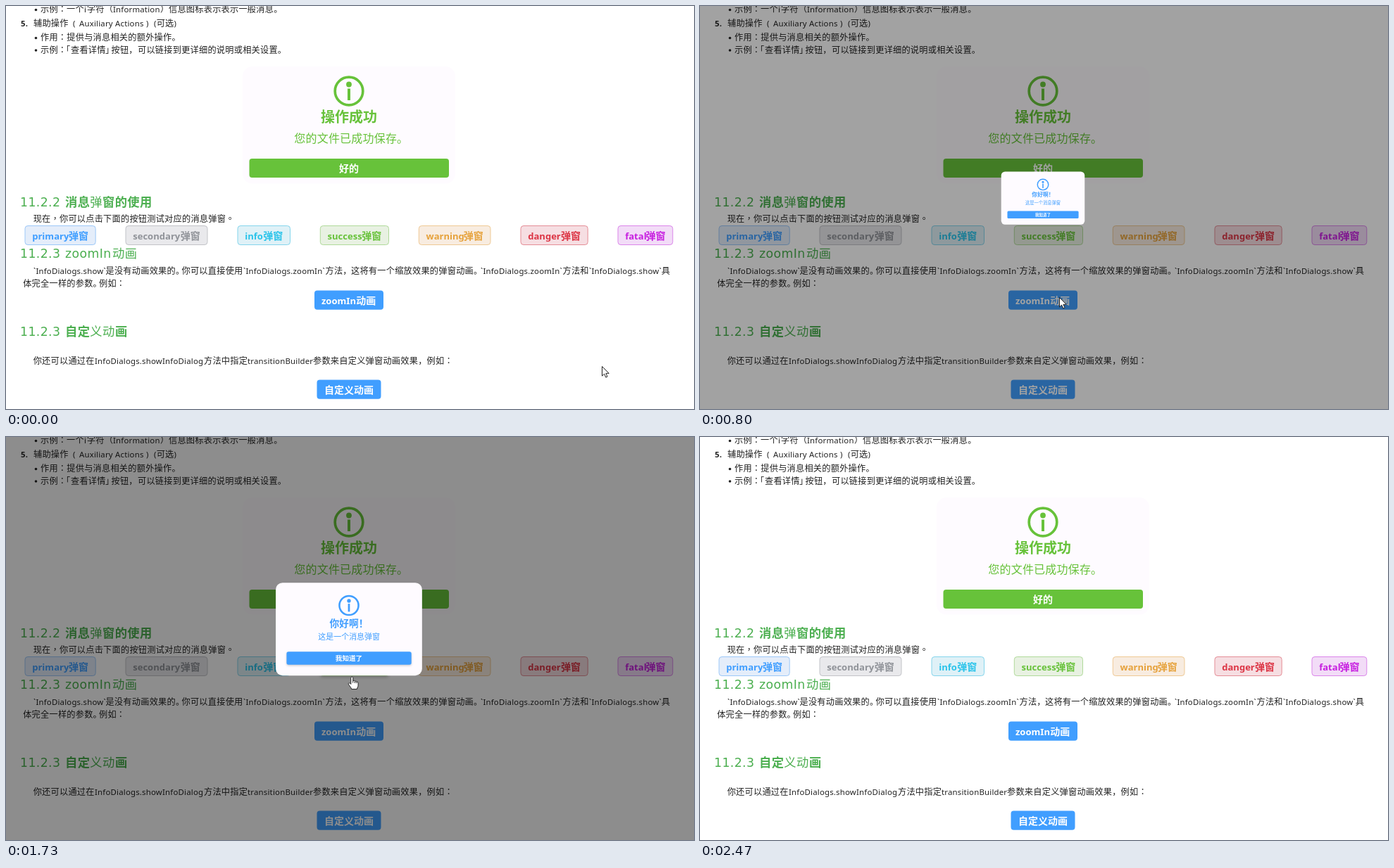
Recreate the animation shown at these times as an HTML page. Size 977 by 573 pixels, loop 3 s.

```html
<!DOCTYPE html>
<html lang="zh-CN">
<head>
<meta charset="utf-8">
<title>InfoDialogs</title>
<style>
html, body { margin: 0; width: 100%; height: 100%; overflow: hidden; background: #fff; }
svg { display: block; width: 977px; height: 573px; }
text { font-family: "Noto Sans CJK SC", "Noto Sans CJK", sans-serif; white-space: pre; text-spacing-trim: space-all; }
.latin { font-family: "Noto Sans", "Open Sans", sans-serif; }
.mid { font-family: "Noto Sans CJK TC", "Noto Sans CJK SC", sans-serif; }
.body { font-size: 12.2px; letter-spacing: .24px; font-weight: 350; fill: #222; }
.body .latin { font-size: 11.4px; letter-spacing: .2px; font-weight: 400; }
.btn { font-size: 14px; font-weight: 700; }
.btn .latin { font-size: 13.05px; }
.head { font-size: 17.3px; letter-spacing: .4px; fill: #4caf50; font-weight: 350; }
.head .latin { font-family: "DejaVu Sans", sans-serif; font-weight: 400; }
.title { font-size: 20px; font-weight: 700; }
.note { font-size: 16px; font-weight: 350; }
.bold { font-weight: 700; }
</style>
</head>
<body>
<svg id="stage" viewBox="0 0 977 573"></svg>
<script>
const BLUE = '#409eff', GREEN = '#67c23a';

// Latin runs get their own font; a colon or a char after ^ is a centred mark.
const runs = str => str.split(/(\^.|：|[ -\]_-~]+)/).filter(Boolean).map(s => {
  if (s[0] === '^' || s === '：') return `<tspan class="mid" lang="zh-TW">${s.slice(-1)}</tspan>`;
  return /[ -~]/.test(s[0]) ? `<tspan class="latin">${s}</tspan>` : `<tspan>${s}</tspan>`;
}).join('');

const text = (cls, x, y, str, fill) =>
  `<text class="${cls}" x="${x}" y="${y}"${fill ? ` style="fill:${fill}"` : ''}>${runs(str)}</text>`;

// parts: x, string, x, string ...
const line = (cls, y, ...parts) => {
  let out = '';
  for (let i = 0; i < parts.length; i += 2) out += text(cls, parts[i], y, parts[i + 1]);
  return out;
};

const box = (x, y, w, h, r, fill, stroke = 'none') =>
  `<rect x="${x}" y="${y}" width="${w}" height="${h}" rx="${r}" fill="${fill}" stroke="${stroke}"/>`;

const bullet = y => `<circle cx="42.5" cy="${y}" r="1.8" fill="#222"/>`;

const infoIcon = (cy, color) =>
  `<g fill="${color}"><circle cx="487" cy="${cy}" r="19.8" fill="none" stroke="${color}" stroke-width="3.7"/>
   <circle cx="487" cy="${cy - 9.5}" r="3.9"/><rect x="485" y="${cy - 3.5}" width="4" height="16.5"/></g>`;

const chip = ([name, x, end, color, bg, edge]) => {
  const label = c => text('btn', x + 10.2, 331.7, name, c) + text('btn', end - 38.3, 331.7, '弹窗', c);
  const rect = (fill, stroke) => box(x, 312.5, end - x, 27, 4, fill, stroke);
  const hover = name === 'success'
    ? `<g id="fill" opacity="0">${rect(color, color)}${label('#fff')}</g>` : '';
  return `<g id="${name}">${rect(bg, edge)}${label(color)}${hover}</g>`;
};

const chips = [
  ['primary', 27, 127.2, BLUE, '#e4edfa', '#9cc8f8'],
  ['secondary', 170, 286, '#909399', '#e9e9ec', '#c2c3c8'],
  ['info', 329, 403.5, '#29c3ea', '#dff1f7', '#85d5ec'],
  ['success', 446.3, 543.5, GREEN, '#e8f1e2', '#b0da9a'],
  ['warning', 586.3, 688, '#e6a23c', '#f8ece0', '#efc994'],
  ['danger', 731, 826.2, '#dc3545', '#f6dee2', '#e48d96'],
  ['fatal', 869, 946.8, '#c71fe0', '#f2dcf7', '#db85ea']
];

const page =
  bullet(5.5) + line('body', 9, 49, '示例：', 86, '一个', 111, 'i', 115, '字符（', 152, 'Information', 219, '）', 231, '信息图标表示表示一般消息。') +
  text('body bold', 21, 28.6, '5.').replace('class="latin"', 'class="latin" style="font-weight:700"') +
  line('body', 28.6, 39, '辅助操作', 95, '(', 104, 'Auxiliary Actions', 199, ')', 210, '(可选)') +
  bullet(45.5) + line('body', 49.3, 49, '作用：提供与消息相关的额外操作。') +
  bullet(63) + line('body', 66.7, 49, '示例：', 79, '「', 92, '查看详情', 141, '」', 149.5, '按钮，', 187, '可以链接到更详细的说明或相关设置。') +
  box(336, 86, 302, 166.5, 14, '#fefbff') + infoIcon(121, GREEN) +
  text('title', 447, 165.3, '操作成功', GREEN) +
  `<g letter-spacing=".2">${text('note', 409.3, 193.5, '您的文件已成功保存。', GREEN)}</g>` +
  box(345.5, 217, 283.5, 27, 4, GREEN) + text('btn', 473, 235.8, '好的', '#fff') +
  line('head', 284.8, 20, '11.2.2', 119.3, '弹') + line('head bold', 284.8, 84, '消息', 137, '窗的使用') +
  line('body', 306.7, 38.7, '现在^，你可以点击下面的按钮测试对应的消息弹窗^。') +
  chips.map(chip).join('') +
  line('head', 358.4, 20, '11.2.3', 84, 'zoomIn', 151, '动画') +
  line('body', 381.3, 39, '`InfoDialogs.show`', 141.5, '是没有动画效果的。', 249.5, '你可以直接使用', 337, '`InfoDialogs.zoomIn`',
    453.5, '方法，', 490, '这将有一个缩放效果的弹窗动画。', 674, '`InfoDialogs.zoomIn`', 790.5, '方法和', 828, '`InfoDialogs.show`', 930.7, '具') +
  line('body', 398.5, 24.2, '体完全一样的参数。', 132, '例如：') +
  `<g id="zoom">${box(438, 404.5, 98, 27.3, 4, BLUE)}${text('btn', 448, 423.7, 'zoomIn', '#fff')}${text('btn', 497.3, 423.7, '动画', '#fff')}</g>` +
  line('head', 469, 20, '11.2.3', 119.3, '义动') + line('head bold', 469, 84, '自定', 155, '画') +
  line('body', 508.6, 38.7, '你还可以通过在', 126, 'InfoDialogs.showInfoDialog', 281, '方法中指定', 343, 'transitionBuilder', 436, '参数来自定义弹窗动画效果，例如：') +
  box(441.5, 531.5, 91, 27.3, 4, BLUE) + text('btn', 452, 550.7, '自定义动画', '#fff');

const dialog =
  box(335.3, 176.8, 303.3, 192.7, 14, '#fefbff') + infoIcon(224, BLUE) +
  text('title', 447, 268.3, '你好啊！', BLUE) + text('note', 423.3, 295.3, '这是一个消息弹窗', BLUE) +
  `<g id="ok">${box(357.7, 320, 258.8, 27.2, 4, BLUE)}${text('btn', 459, 338.8, '我知道了', '#fff')}</g>`;

const cursor = `<g id="cursor" fill="#fff" stroke="#222" stroke-linejoin="round">
  <path id="arrow" d="M.5 .5V14l3.1-2.9 2.2 4.9 2.2-1-2.1-4.7h4.3z"/>
  <path id="hand" d="M-1.7 2C-1.7 -.1 1.3 -.1 1.3 2V6.5C1.6 5.2 4 5.4 4 7C4.4 6 6.4 6.3 6.4 7.8C7 7 8.6 7.5 8.6 9V12.5C8.6 15 7 15.5 7 17.8H-1C-1 15.6 -3.2 14.5 -5.2 10.6C-5.7 9.2 -3.6 8.2 -1.7 10.8zM1.3 6.5V9M4 7V9.3M6.4 7.8V9.5"/></g>`;

stage.innerHTML = page + '<rect id="scrim" width="977" height="573"/>' +
  `<g id="dialog">${dialog}</g>` + cursor;

const $ = id => document.getElementById(id);

const bezier = (x1, y1, x2, y2) => x => {
  if (x <= 0 || x >= 1) return x <= 0 ? 0 : 1;
  const at = (a, b, s) => 3 * a * s * (1 - s) ** 2 + 3 * b * s * s * (1 - s) + s ** 3;
  let lo = 0, hi = 1;
  for (let i = 0; i < 24; i++) {
    const s = (lo + hi) / 2;
    if (at(x1, x2, s) < x) lo = s; else hi = s;
  }
  return at(y1, y2, lo);
};
const ease = bezier(.25, .1, .25, 1), easeInOut = bezier(.42, 0, .58, 1);

// Rows: tick, values ... ; linear between rows.
const track = (rows, k) => {
  if (k <= rows[0][0]) return rows[0].slice(1);
  const i = rows.findIndex(r => r[0] >= k);
  if (i < 0) return rows[rows.length - 1].slice(1);
  const a = rows[i - 1], b = rows[i], f = (k - a[0]) / (b[0] - a[0]);
  return a.slice(1).map((v, j) => v + (b[j + 1] - v) * f);
};

const path = [
  [0, 846, 512], [1, 838, 509], [4, 690, 458], [7, 535, 419], [8, 512, 415], [11, 511.5, 415],
  [12, 510, 414], [15, 508, 411], [16, 508, 411], [17, 503, 408], [20, 495, 374], [22, 491.5, 347],
  [23, 491, 342.5], [25, 491, 342], [27, 492, 339.3], [30, 490, 341], [32, 468, 366], [34, 290, 466], [36, 10, 562]
];
const lift = {
  zoom: [[7, 0], [9, 1], [11, 1], [12, 0]],
  ok: [[21, 0], [23, 1], [25, 1], [27, 0]],
  success: [[25, 0], [27, 1], [31, 1], [34, 0]]
};
const fillTrack = [[25, 0], [27, .6], [28, .9], [29, 1], [30, 1], [31, .5], [32, 0]];

const LOOP = 3000, TICK = LOOP / 45, OPEN = 691, CLOSE = 1636, SPAN = 250;

function draw(now) {
  const k = Math.floor(((now + 4) % LOOP) / TICK), t = k * TICK;
  const p = Math.min(1, Math.max(0, t < CLOSE ? (t - OPEN) / SPAN : 1 - (t - CLOSE) / SPAN));
  $('scrim').setAttribute('opacity', ease(p) / 2);
  $('dialog').style.display = p > 0 ? '' : 'none';
  $('dialog').setAttribute('transform', `translate(487 273.1) scale(${easeInOut(p)}) translate(-487 -273.1)`);

  for (const id in lift) {
    const a = track(lift[id], k)[0];
    $(id).style.filter = a ? `drop-shadow(0 2.5px 2px rgba(0,0,0,${a * .4}))` : 'none';
  }
  $('fill').setAttribute('opacity', track(fillTrack, k)[0]);

  const hand = (k >= 8 && k <= 11) || (k >= 22 && k <= 30);
  $('hand').style.display = hand ? '' : 'none';
  $('arrow').style.display = hand ? 'none' : '';
  $('cursor').style.display = k > 36 ? 'none' : '';
  $('cursor').setAttribute('transform', `translate(${track(path, k)})`);
}

const start = performance.now();
const loop = () => {
  draw(performance.now() - start);
  requestAnimationFrame(loop);
};
loop();
</script>
</body>
</html>
```
